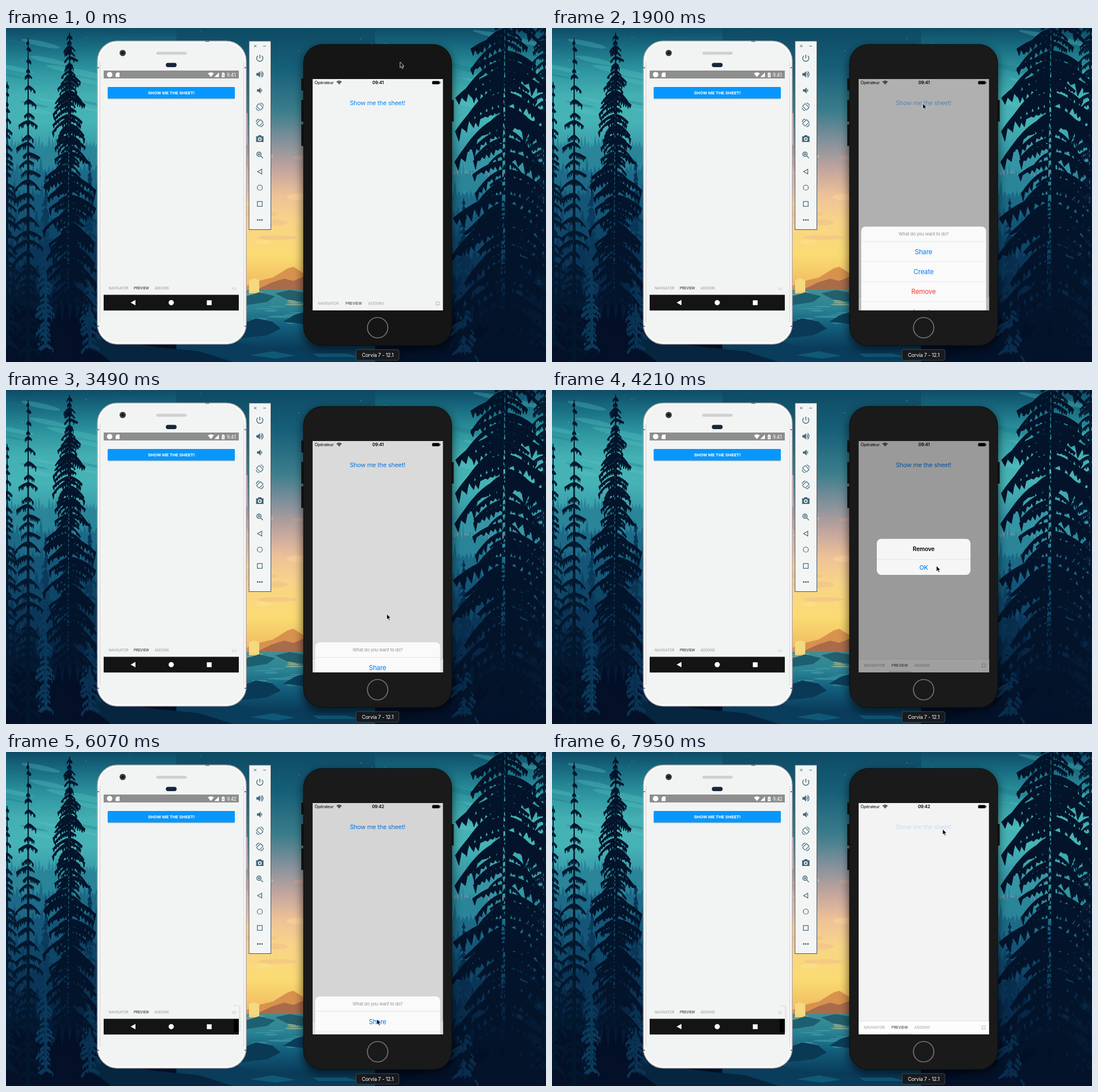
Write an HTML page that moves like this. It is 951 by 589 pixels and loops after 8 s.

```html
<!DOCTYPE html>
<html lang="en">
<head>
<meta charset="utf-8">
<title>Action sheet demo</title>
<style>
  html, body { margin: 0; width: 100%; height: 100%; overflow: hidden; background: #0b3550; }
  svg { display: block; width: 951px; height: 589px; }
  text { font-family: Inter, "Open Sans", sans-serif; letter-spacing: -.02em; }
  .droid text { font-family: Roboto, sans-serif; letter-spacing: 0; }
  .mid { text-anchor: middle; }
  .item { font-size: 11.7px; fill: #087cfb; }
  .icon { fill: none; stroke: #42687a; stroke-width: 1.4; }
  .icon .solid { fill: #42687a; stroke: none; }
  .tab { font-size: 6.4px; fill: #999; }
  .ios .tab { letter-spacing: .01em; }
  .on { fill: #222 !important; }
</style>
</head>
<body>
<svg viewBox="0 0 951 589">
  <defs>
    <linearGradient id="sky" x2="0" y2="1">
      <stop stop-color="#0f4c66"/><stop offset=".04" stop-color="#15637a"/>
      <stop offset=".12" stop-color="#2b929d"/><stop offset=".2" stop-color="#44b0b3"/>
      <stop offset=".28" stop-color="#46b3b6"/><stop offset=".38" stop-color="#3595a5"/>
    </linearGradient>
    <linearGradient id="dusk" x2="0" y2="1">
      <stop stop-color="#0e4a64"/><stop offset=".12" stop-color="#165f78"/>
      <stop offset=".25" stop-color="#3c7d8c"/><stop offset=".34" stop-color="#84919b"/>
      <stop offset=".42" stop-color="#c0a49e"/><stop offset=".5" stop-color="#eec198"/>
      <stop offset=".58" stop-color="#f8d588"/><stop offset=".68" stop-color="#fadb72"/>
      <stop offset=".76" stop-color="#f2bf62"/>
    </linearGradient>
    <linearGradient id="lake" x2="0" y2="1">
      <stop stop-color="#3f8f96"/><stop offset=".25" stop-color="#2a8394"/>
      <stop offset=".5" stop-color="#135f7d"/><stop offset=".8" stop-color="#0a3d5c"/><stop offset="1" stop-color="#08304e"/>
    </linearGradient>
    <filter id="soft" x="-20%" y="-20%" width="140%" height="140%"><feGaussianBlur stdDeviation="8"/></filter>
    <clipPath id="screen"><rect x="540" y="90" width="229.5" height="408"/></clipPath>
  </defs>

  <rect width="951" height="589" fill="url(#sky)"/>
  <g id="scenery"></g>

  <!-- Android phone -->
  <g class="droid">
    <path d="M423.500 150v56M423.500 245v49" stroke="#c9bfc0" stroke-width="3"/>
    <rect x="161" y="23" width="262" height="534.500" rx="35" fill="#f3f4f4" stroke="#b9a9ac" stroke-width="1.500"/>
    <rect x="163" y="25" width="258" height="530.500" rx="33" fill="#f2f4f3" stroke="#fff" stroke-width="2"/>
    <path d="M165.500 60V520M419 60V520" stroke="#d8cccd"/>
    <path d="M351 23.500h7M161 70h3M420 70h3M161 526h3M420 526h3" stroke="#777" stroke-width="2"/>
    <circle cx="205.500" cy="44" r="5.500" fill="#3b3b3d"/><circle cx="205.500" cy="44" r="2.500" fill="#15151a"/>
    <rect x="265" y="42.300" width="53" height="4.400" rx="2.200" fill="#d0d0d0" stroke="#c4c4c4" stroke-width=".5"/>
    <rect x="281.500" y="61.500" width="19" height="7.500" rx="3.700" fill="#17263a"/>
    <rect x="172" y="75" width="238" height="14" fill="#8e8e8e"/>
    <g fill="#fff">
      <circle cx="182.500" cy="82.200" r="4.800"/>
      <path d="M195.500 78.500h4.500v8h-7v-5.500z"/>
      <path d="M355.500 80q5.300-3.600 10.600 0l-5.300 6.600zM375 78.500v8h-8z"/>
      <path d="M380 79.500h1.500v-1h2v1h1.500v7.300h-5z"/>
      <text id="clockA" x="389" y="85.700" font-size="8.600">9:41</text>
    </g>
    <path d="M382.500 81l-1.200 2.200h2.200l-1.200 2.200" fill="none" stroke="#8e8e8e" stroke-width=".7"/>
    <rect x="179" y="105.500" width="224" height="20" rx="1.500" opacity=".25"/>
    <rect x="179" y="104" width="224" height="20.200" rx="1.500" fill="#0797fc"/>
    <text class="mid" x="291" y="117.200" font-size="8" font-weight="700" fill="#fff">SHOW ME THE SHEET!</text>
    <text class="tab" x="181" y="461">NAVIGATOR</text>
    <text class="tab on" x="225" y="461">PREVIEW</text>
    <text class="tab" x="261.500" y="461">ADDONS</text>
    <path d="M399.500 457v4h5v-4" fill="none" stroke="#bbb" stroke-width=".8"/>
    <rect x="172" y="470.500" width="238" height="27.700" fill="#141414"/>
    <g id="glitch">
      <path d="M401 447.500h9M399.500 457h5" stroke="#ccc" stroke-width=".7"/>
      <rect x="401" y="471" width="9" height="23"/>
      <rect x="410" y="447" width="3" height="46" fill="#e4e5e5"/>
    </g>
    <path d="M228 479.500v9.500l-8.500-4.700z" fill="#fff"/>
    <circle cx="291" cy="484.300" r="4.600" fill="#fff"/>
    <rect x="353.700" y="480.200" width="8.500" height="8.500" fill="#fff"/>
  </g>

  <!-- emulator toolbar -->
  <rect x="428" y="23" width="38.500" height="332.500" fill="#f3f5f5" stroke="#46545c"/>
  <g class="icon">
    <path d="M436.800 29.700l4.200 4.200m0-4.200l-4.200 4.200M453 32h5" stroke-width="1"/>
    <path d="M443.500 49a5.500 5.500 0 1 0 7 0M447 47v6.500"/>
    <path class="solid" d="M441 79.500h3l3.500-3.500v11.500l-3.500-3.500h-3zM442 108.300h3l3.500-3.500v11l-3.500-3.500h-3z"/>
    <path d="M449 79q2 2.700 0 5.400M450 76.300q5.500 5.400 0 10.800M449.800 108q1.500 2.200 0 4.400"/>
    <g stroke-width="1.200">
      <rect x="443.700" y="134" width="6.600" height="10" rx=".8" transform="rotate(-45 447 139)"/>
      <path d="M440.500 140.500q.7 4.500 5.500 5.500M448 132q4.800 1 5.500 5.500"/>
      <rect x="443.700" y="162.300" width="6.600" height="10" rx=".8" transform="rotate(45 447 167.300)"/>
      <path d="M453.500 168.800q-.7 4.500-5.500 5.500M446 160.300q-4.800 1-5.500 5.500"/>
    </g>
    <path class="solid" d="M440.500 191h3l1.500-2h4l1.500 2h3v10h-13z"/>
    <circle cx="447" cy="196" r="2.500" stroke="#fff"/>
    <circle cx="445.500" cy="222.500" r="3.800"/><path d="M448.500 225.500l4 4M443.500 222.500h4M445.500 220.500v4"/>
    <path d="M450.500 249v8.500l-7.500-4.200z" stroke-width="1.200"/>
    <circle cx="447" cy="281.500" r="4.500" stroke-width="1.200"/>
    <rect x="442.700" y="306" width="8.500" height="8.500" stroke-width="1.200"/>
    <path class="solid" d="M442 337.300h2.500v2.500h-2.500zm3.800 0h2.500v2.500h-2.500zm3.800 0h2.500v2.500h-2.500z"/>
  </g>

  <!-- iOS phone -->
  <rect x="522" y="34" width="265" height="534" rx="34" opacity=".55" filter="url(#soft)"/>
  <path d="M522 89v21M522 127v38M522 170v38M786.500 127v38" stroke="#111" stroke-width="4"/>
  <rect id="shell" x="524" y="29" width="261" height="531" rx="33" stroke="#0c0c0c"/>
  <circle cx="654.500" cy="528.500" r="18" fill="none" stroke="#747474" stroke-width="1.700"/>
  <rect x="616.500" y="567" width="75.500" height="19" rx="3" fill="#181b1e" stroke="#4c5256" stroke-width=".8"/>
  <text class="mid" x="654.500" y="579.800" font-size="8.900" fill="#fff">Corvia 7 - 12.1</text>
  <g class="ios" clip-path="url(#screen)">
    <rect id="page" x="540" y="90" width="230" height="408"/>
    <text x="543.500" y="98.800" font-size="7.300">Opérateur</text>
    <g fill="none" stroke="#000" stroke-width="1.300">
      <path d="M582.500 95.500q4.200-3.600 8.400 0M584.200 97.300q2.500-2.200 5 0"/>
      <path d="M586 98.500h1.500"/>
    </g>
    <text id="clockI" class="mid" x="655.200" y="99" font-size="7.700" font-weight="600">09:41</text>
    <rect x="750.500" y="93.500" width="13" height="5.700" rx="1.500"/><path d="M764.500 95v2.500" stroke="#000"/>
    <text id="link" class="mid" x="654.300" y="136" font-size="10.900" fill="#0a84f5">Show me the sheet!</text>
    <g id="bar">
      <rect x="540" y="475" width="230" height="23" fill="#fdfdfd"/>
      <path d="M540 474.500h230" stroke="#e2e2e2"/>
      <path d="M593 496.700h40" stroke="#dcdcdc" stroke-width="2"/>
    </g>
    <text class="tab" x="549.300" y="487.800">NAVIGATOR</text>
    <text class="tab on" x="598" y="487.800">PREVIEW</text>
    <text class="tab" x="638" y="487.800">ADDONS</text>
    <rect x="757.500" y="483" width="5.500" height="5.500" fill="none" stroke="#aaa" stroke-width=".8"/>
    <rect id="dim" x="540" y="90" width="230" height="408"/>
    <g id="sheet">
      <rect x="544.500" y="286" width="220" height="167.500" rx="8" fill="#fafafa"/>
      <rect id="hotItem" x="544.500" y="383.500" width="220" height="35" fill="#e5e5e5"/>
      <path d="M544.500 312.500h220M544.500 348h220M544.500 383.300h220M544.500 418.500h220" stroke="#e1e1e1" stroke-width=".8"/>
      <text class="mid" x="654.500" y="302.300" font-size="7.800" fill="#929292">What do you want to do?</text>
      <g class="mid item">
        <text x="654.300" y="334.700">Share</text>
        <text x="654.300" y="370">Create</text>
        <text x="654.300" y="405.200" fill="#f53d32">Remove</text>
        <text x="654.300" y="440.400">Locate</text>
        <rect id="cancel" x="544.500" y="458.500" width="220" height="35" rx="8"/>
        <text x="654.300" y="480.200" font-weight="600">Cancel</text>
      </g>
    </g>
    <g id="alert" class="mid">
      <rect x="572" y="262.500" width="165" height="63.500" rx="8" fill="#f7f7f7"/>
      <path d="M572 299h165" stroke="#dcdcdc" stroke-width=".8"/>
      <text x="654.500" y="284.300" font-size="10.200" font-weight="600">Remove</text>
      <text x="654.500" y="316.700" font-size="10.700" font-weight="500" fill="#087cfb">OK</text>
    </g>
  </g>
  <path id="cursor" d="M0 0V10L2.300 7.900 3.900 11.500 5.600 10.700 4 7.200H7Z" stroke="#fff" stroke-width=".8"/>
</svg>

<script>
const $ = id => document.getElementById(id);
const set = (id, name, value) => $(id).setAttribute(name, value);

// ---------- scenery ----------
let seed = 11;
const rnd = () => (seed = seed * 16807 % 2147483647) / 2147483647;
const shape = (d, fill, opacity = 1) => `<path d="${d}" fill="${fill}" opacity="${opacity}"/>`;
const oval = (x, y, rx, ry, fill, opacity = 1) =>
  `<ellipse cx="${x}" cy="${y}" rx="${rx}" ry="${ry}" fill="${fill}" opacity="${opacity}"/>`;

// a jagged line of far trees
function forest(x0, x1, y, size, fill) {
  let d = `M${x0} 589V${y}`;
  for (let x = x0; x < x1; x += size) {
    const top = y - size * 3.5 * rnd() ** 2, low = y + size * (.5 + rnd());
    d += `L${x} ${low}L${x + size * .5} ${top}L${x + size * .8} ${(top + low) / 2}`;
  }
  return shape(d + `L${x1} ${y}V589Z`, fill);
}

// a near fir: drooping, overlapping branches fringed with hanging needles
function fir(x, top, bottom, reach, gap, fill) {
  let d = `M${x} ${top}L${x + reach * .12} ${bottom}H${x - reach * .12}Z`;
  for (let y = top + 6; y < bottom; y += gap * (.5 + rnd())) {
    const grown = Math.min(1, (y - top) / 260);
    for (const side of [-1, 1]) {
      const len = reach * (.08 + .92 * grown ** .8) * (.3 + .8 * rnd());
      const drop = len * (.35 + .5 * rnd()), thick = 2 + len * .14;
      const at = f => [x + side * len * f, y + drop * f * f];
      d += `M${x} ${y - 2}Q${x + side * len * .5} ${y} ${at(1)}`;
      for (let f = .88; f > 0; f -= .14) {
        const [px, py] = at(f);
        d += `L${px + side * len * .05} ${py + thick * (.8 + 1.6 * rnd())}L${px} ${py + thick * .6}`;
      }
      d += `L${x} ${y + thick * 1.5}Z`;
    }
  }
  return `<path d="${d}" fill="${fill}" fill-rule="nonzero" stroke="${fill}"/>`;
}

function scenery() {
  let out = '';
  for (let i = 0; i < 22; i++) {
    const x = i % 2 ? 790 + rnd() * 160 : rnd() * 160, y = 15 + rnd() * 150;
    out += `<g transform="rotate(12 ${x} ${y})">${oval(x, y, 25 + rnd() * 45, 1.5 + rnd() * 4, i % 3 ? '#5cc8c8' : '#1c7286', .3)}</g>`;
  }
  out += shape('M770 270L800 250 835 262 870 252 951 280V320H770Z', '#7f8ba0');
  const shades = ['#2a8599', '#1c6a87', '#145678', '#0e4668', '#0a3558', '#072646', '#041934', '#030f26'];
  shades.forEach((fill, i) => {
    const y = 205 + i * 43, size = 6 + i;
    out += forest(-5, 310, y, size, fill) + forest(640, 960, y + 50 - i * 7, size, fill);
  });
  out += '<rect x="300" width="350" height="589" fill="url(#dusk)"/>';
  for (let i = 0; i < 10; i++)
    out += oval(430 + rnd() * 95, 200 + rnd() * 190, 14 + rnd() * 25, 2 + rnd() * 4, i % 2 ? '#ffe9a0' : '#e8a890', .3);
  out += shape('M415 458L445 446 470 440 496 424 506 421 530 436V470H415Z', '#d8924f');
  out += shape('M440 462L470 448 490 442 506 446 530 436V475H440Z', '#a86c4b');
  out += '<rect x="300" y="462" width="350" height="127" fill="url(#lake)"/>';
  out += shape('M428 468V444h4v-2h10v2h4V468Z', '#f4d980');
  for (let i = 0; i < 16; i++)
    out += oval(425 + rnd() * 100, 466 + i * 3.6, 8 + rnd() * 18, 1 + rnd() * 1.3, i < 7 ? '#d8c583' : '#4fa6ac', .5);
  out += shape('M415 476L446 466 474 473 460 483 415 490Z', '#1c5f70');
  out += shape('M530 468L500 462 474 468 496 479 530 484Z', '#245f6d');
  out += shape('M415 522L440 512 468 517 484 530 460 542 415 547Z', '#0a3956');
  out += shape('M540 496L508 506 488 518 540 524Z', '#0b3e5b');
  out += shape('M300 589V560L400 552 440 563 500 571 560 563 650 570V589Z', '#0a3c5b');
  out += shape('M430 577l40-7 40 8-35 5ZM540 574h60l20 6h-70Z', '#126684', .7);
  out += shape('M130 589L160 535 200 552 260 562 340 570 400 589Z', '#06253f');
  out += shape('M690 589Q740 556 800 550T951 525V589Z', '#03122a');
  out += shape('M0 480Q70 500 130 545L185 589H0Z', '#031027');
  out += fir(70, 255, 560, 18, 9, '#0b3a5b') + fir(148, 235, 560, 20, 9, '#0a3455');
  out += fir(2, 95, 560, 24, 13, '#041a31') + fir(39, 18, 589, 26, 17, '#03172c') + fir(112, 8, 480, 46, 8, '#03142a');
  out += fir(806, 300, 570, 24, 9, '#092d4c') + fir(948, -60, 560, 40, 10, '#041a32') + fir(880, -150, 560, 92, 11, '#03142a');
  for (let i = 0; i < 45; i++)
    out += oval(rnd() * 951, rnd() * 110, .6, .6, '#d8f4f0', .3 + .5 * rnd());
  return out;
}
$('scenery').innerHTML = scenery();

// ---------- timing ----------
const LOOP = 8000;
// [first change, last change, count] of each stretch of screen updates
const bursts = [[390, 1150, 7], [1750, 2310, 5], [2580, 2700, 2], [3060, 3940, 7],
                [4210, 5180, 8], [5330, 6360, 8], [6510, 6930, 4], [7320, 7950, 6]];
const ticks = [0, ...bursts.flatMap(([a, b, n]) =>
  Array.from({ length: n }, (_, i) => Math.floor((a + (b - a) * i / (n - 1)) / 10) * 10))];

const path = [[300, 694, 60], [1150, 653, 133], [1900, 653, 133], [2310, 668, 414], [2500, 668, 414],
              [2700, 670, 403], [3250, 670, 403], [3800, 677, 310], [4215, 677, 310], [4720, 688, 136],
              [4930, 688, 136], [5040, 689, 163], [5500, 653, 471], [6090, 653, 471], [6440, 672, 136],
              [6540, 672, 136], [6920, 655, 471], [7400, 655, 471], [7900, 688, 136], [8000, 688, 136]];
const taps = [[1700, 1790], [4760, 5030], [6400, 6520], [7940, 8100]];
const visits = [[1710, 3150], [4970, 5885], [6480, 7310]];   // sheet rises, sheet falls

const clamp = v => Math.min(1, Math.max(0, v));
const out = v => 1 - (1 - clamp(v)) ** 2;
const smooth = v => v * v * (3 - 2 * v);

function cursorAt(t) {
  const i = path.findIndex(p => p[0] > t);
  if (i < 1) return path[i ? path.length - 1 : 0].slice(1);
  const [t0, x0, y0] = path[i - 1], [t1, x1, y1] = path[i];
  const k = smooth((t - t0) / (t1 - t0));
  return [x0 + (x1 - x0) * k, y0 + (y1 - y0) * k];
}

function draw(t) {
  const rise = visits.reduce((sum, [a, b]) => sum + out((t - a) / 400) - out((t - b) / 400), 0);
  const shown = out((t - 3470) / 300), gone = clamp((t - 4185) / 300);
  const alert = shown * (1 - gone);
  const tap = taps.findLast(([down]) => t >= down);
  const minute = t < 5600 ? '41' : '42';
  const woken = t >= 1750;

  set('shell', 'fill', t < 390 ? '#151515' : '#1a1a1a');
  set('page', 'fill', woken ? '#f3f3f3' : '#f2f4f3');
  set('bar', 'opacity', woken ? 1 : 0);
  set('link', 'opacity', tap ? .2 + .8 * clamp((t - tap[1]) / 250) : 1);
  set('dim', 'opacity', .4 * Math.max(rise, alert));
  set('sheet', 'transform', `translate(0 ${212 * (1 - rise)})`);
  set('hotItem', 'opacity', t >= 3060 && t < 4000 ? 1 : 0);
  set('cancel', 'fill', t >= 5760 && t < 6400 || t >= 7320 ? '#ececec' : '#fff');
  set('alert', 'opacity', shown * (1 - gone * gone));
  set('alert', 'transform', `translate(654.5 294) scale(${1.15 - .15 * shown}) translate(-654.5 -294)`);
  set('glitch', 'opacity', minute === '42' ? 1 : 0);
  set('cursor', 'transform', `translate(${cursorAt(t)})`);
  $('clockA').textContent = '9:' + minute;
  $('clockI').textContent = '09:' + minute;
}

function frame(now) {
  const t = now % LOOP;
  draw(ticks.findLast(tick => tick <= t));
  requestAnimationFrame(frame);
}
draw(0);
requestAnimationFrame(frame);
</script>
</body>
</html>
```
